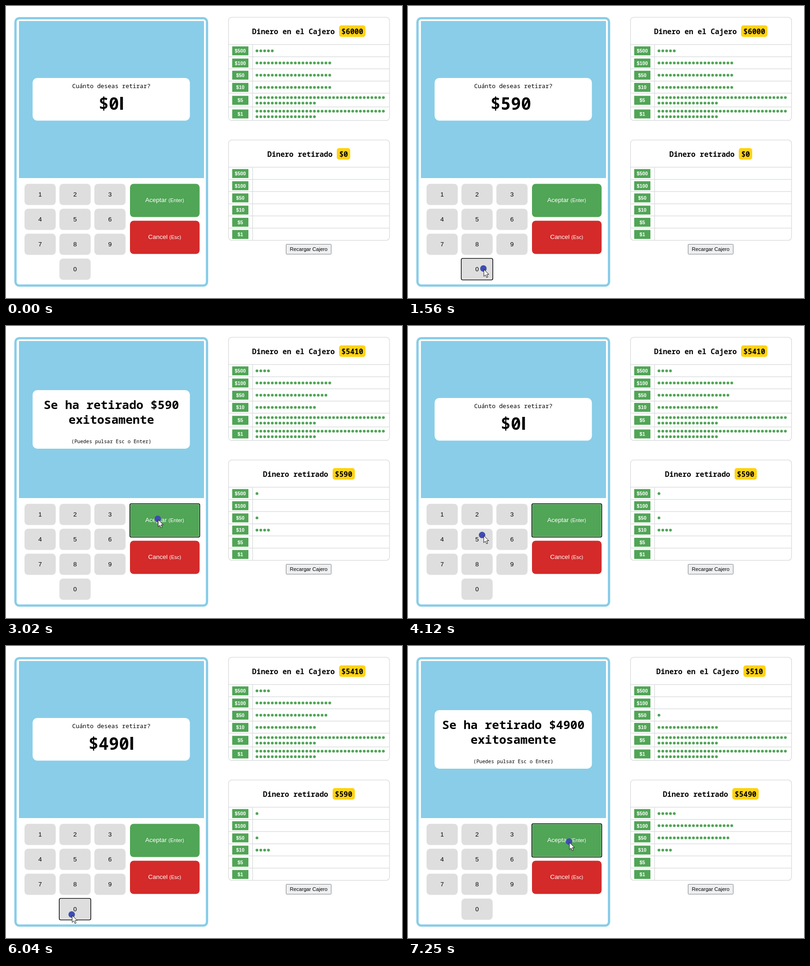
An HTML page that plays this animation: 856 px wide and 633 px high, repeating every 8000 ms.

```html
<!DOCTYPE html>
<html lang="es">
<head>
<meta charset="utf-8">
<title>Cajero</title>
<style>
  html, body { margin: 0; width: 100%; height: 100%; overflow: hidden; background: #fff; }
  svg { display: block; }
  text { font-family: "Liberation Sans", Arial, sans-serif; font-size: 13.5px; fill: #000; }
  .mid { text-anchor: middle; }
  .mono { font-family: "Noto Sans Mono", monospace; }
  .bold { font-weight: 700; }
  .semi { font-weight: 600; }
  .title { font-size: 15.67px; }
  .message { font-size: 25.66px; }
  .hint { font-size: 10.68px; }
  .ask { font-size: 12.83px; }
  .amount { font-size: 36.67px; }
  .caret { font-size: 40px; }
  .reload { font-size: 11.1px; }
  .bill { font-size: 10.7px; fill: #fff; }
  .action { fill: #fff; }
  .small { font-size: 11px; }
  .line { fill: none; stroke: #dcdedf; stroke-width: 1.5; }
  .dot { fill: #50a556; }
  .ring { fill: none; stroke: #111; stroke-width: 1.6; }
  .glow { fill: none; stroke: #fff; stroke-opacity: .6; stroke-width: .8; }
</style>
</head>
<body>
<svg id="stage" width="856" height="633" viewBox="0 0 856 633"></svg>
<script>
const LOOP = 8000, TICK = 120, DWELL = 120, REPLY = 100;
const BLUE = '#89cde8', GREEN = '#50a556', RED = '#d42a2a', GREY = '#dedede', GOLD = '#ffd314';
const BILLS = [500, 100, 50, 10, 5, 1];
const START = [5, 20, 20, 20, 50, 50];
const PER_LINE = 34;
const CENTER = 227.7;

// What the user does: the pointer arrives at (x, y) and presses the key.
const ACTIONS = [
  { t: 120, x: 456, y: 624 },
  { t: 720, x: 158, y: 463, key: '5' },
  { t: 1080, x: 226, y: 516, key: '9' },
  { t: 1440, x: 163, y: 569, key: '0' },
  { t: 1920, x: 350, y: 436, key: 'Aceptar' },
  { t: 2900, x: 328, y: 418 },
  { t: 3290, x: 328, y: 418, key: 'Enter' },
  { t: 4900, x: 84, y: 469, key: '4' },
  { t: 5440, x: 223, y: 512, key: '9' },
  { t: 5920, x: 142, y: 582, key: '0' },
  { t: 6280, x: 142, y: 582, key: '0' },
  { t: 6640, x: 338, y: 424, key: 'Aceptar' },
  { t: 7240, x: 348, y: 424 }
];

// Greedy payout, largest bills first.
function payOut(amount, stock) {
  return stock.map((have, i) => {
    const n = Math.min(have, Math.floor(amount / BILLS[i]));
    amount -= n * BILLS[i];
    return have - n;
  });
}

// Replays all presses up to t; the machine answers shortly after each one.
function machine(t) {
  const state = { amount: '0', done: false, focus: '', stock: START };
  for (const { t: pressed, key } of ACTIONS) {
    if (!key || pressed > t) continue;
    if (key !== 'Enter') state.focus = key;
    if (pressed + REPLY > t) continue;
    if (key === 'Enter') {
      state.amount = '0';
      state.done = false;
    } else if (key === 'Aceptar') {
      state.done = true;
      state.stock = payOut(+state.amount, state.stock);
    } else {
      state.amount = String(+(state.amount + key));
    }
  }
  return state;
}

// Rest after each action, then ease out towards the next one.
function position(t) {
  const next = ACTIONS.findIndex(a => a.t > t);
  const b = ACTIONS.at(next), a = next > 0 ? ACTIONS[next - 1] : b;
  const start = a.t + DWELL;
  const u = a === b ? 1 : Math.max(0, (t - start) / (b.t - start));
  const k = 1 - (1 - u) ** 1.8;
  return [a.x + (b.x - a.x) * k, a.y + (b.y - a.y) * k];
}

function snap(t) {
  const shift = t < 2400 ? 0 : 40;
  return Math.floor((t - shift) / TICK) * TICK + shift;
}

const rect = (x, y, w, h, r, fill, more = '') =>
  `<rect x="${x}" y="${y}" width="${w}" height="${h}" rx="${r}" fill="${fill}" ${more}/>`;
const text = (x, y, cls, str) => `<text x="${x}" y="${y}" class="${cls}">${str}</text>`;

function button(x, y, w, h, fill, focused, label) {
  const frame = (d, cls) => rect(x - d, y - d, w + 2 * d, h + 2 * d, 3, 'none', `class="${cls}"`);
  return rect(x, y, w, h, focused ? 3 : 8, fill) +
    (focused ? frame(-.9, 'glow') + frame(.3, 'ring') : '') + label;
}

function keypad(focus) {
  let out = '';
  [...'1234567890'].forEach((key, i) => {
    const x = 40 + 75.5 * (key === '0' ? 1 : i % 3);
    const y = 385.5 + 54 * Math.floor(i / 3);
    out += button(x, y, 67.5, 46, GREY, key === focus, text(x + 33.75, y + 27.3, 'mid', key));
  });
  [['Aceptar', 'Enter', GREEN], ['Cancel', 'Esc', RED]].forEach(([name, key, fill], i) => {
    const y = 385.5 + 80 * i;
    const label = `${name} <tspan class="small">(${key})</tspan>`;
    out += button(268, y, 150.5, 72, fill, name === focus, text(343, y + 39.7, 'mid action', label));
  });
  return out;
}

function dots(n, y) {
  let out = '';
  for (let i = 0; i < n; i++) {
    const cx = 542.5 + 8.28 * (i % PER_LINE);
    out += `<circle class="dot" cx="${cx}" cy="${y + 12 * Math.floor(i / PER_LINE)}" r="3"/>`;
  }
  return out;
}

function table(top, title, counts) {
  const total = '$' + counts.reduce((sum, n, i) => sum + n * BILLS[i], 0);
  const lead = (title.length + 1) * 9.4, badge = total.length * 9.4 + 10;
  const x = 654.6 - (lead + badge) / 2;
  let y = top + 59, lines = '';
  let out = text(x, top + 36, 'mono semi title', title) +
    rect(Math.round(x + lead), top + 17.5, Math.round(badge), 25, 5, GOLD) +
    text(x + lead + 5, top + 36, 'mono semi title', total);
  counts.forEach((n, i) => {
    const two = n > PER_LINE, h = two ? 29.6 : 26.4, mid = y + h / 2 + .5;
    lines += `M481 ${y}H829`;
    out += rect(489, mid - 9.7, 35, 19.4, 0, GREEN) +
      text(506.5, mid + 4, 'mid bold bill', '$' + BILLS[i]) +
      dots(n, two ? mid - 6 : mid);
    y += h;
  });
  return out + `<path class="line" d="${lines}M533 ${top + 59}V${y}"/>` +
    rect(481, top, 348, y - top, 7, 'none', 'class="line"');
}

function display({ amount, done }, t) {
  if (done) {
    return rect(57.5, 139, 340, 127, 10, '#fff') +
      text(CENTER, 179.5, 'mid mono semi message', 'Se ha retirado $' + amount) +
      text(CENTER, 211.7, 'mid mono semi message', 'exitosamente') +
      text(CENTER, 253.5, 'mid mono hint', '(Puedes pulsar Esc o Enter)');
  }
  const width = (amount.length + 1) * 22;
  const x = CENTER - (width + 11) / 2;
  const blink = (t + 150) % 1000 < 500;
  return rect(57.5, 156, 340, 92.5, 10, '#fff') +
    text(CENTER, 178, 'mid mono ask', 'Cuánto deseas retirar?') +
    text(x, 224.5, 'mono bold amount', '$' + amount) +
    (blink ? text(x + width, 224.5, 'bold caret', 'I') : '');
}

// The arrow trails its marker slightly.
function pointer(t) {
  if (t < ACTIONS[0].t) return '';
  const [x, y] = position(t), [ax, ay] = position(t - 15);
  return `<circle cx="${x}" cy="${y}" r="7" fill="#3f4db0"/>` +
    `<path transform="translate(${ax + 1} ${ay + 2})" fill="#fff" stroke="#111"
      d="M0 0V15.2L3.6 11.9L6 17.6L8.6 16.5L6.2 11H11Z"/>`;
}

function draw(t) {
  const state = machine(t), tick = snap(t);
  return rect(20.5, 26.5, 414, 579.5, 8, '#fff', `stroke="${BLUE}" stroke-width="5"`) +
    rect(28, 32.5, 400, 340.5, 0, BLUE) +
    display(state, tick) +
    keypad(state.focus) +
    table(24.5, 'Dinero en el Cajero', state.stock) +
    table(290.5, 'Dinero retirado', START.map((n, i) => n - state.stock[i])) +
    rect(605.5, 516.5, 97.5, 21.5, 1.5, '#eef0f1', 'stroke="#7b7f82"') +
    text(654.3, 531, 'mid reload', 'Recargar Cajero') +
    pointer(tick);
}

const stage = document.getElementById('stage');
const origin = performance.now();
let shown = '';
function frame() {
  const picture = draw((performance.now() - origin) % LOOP);
  if (picture !== shown) stage.innerHTML = shown = picture;
  requestAnimationFrame(frame);
}
frame();
</script>
</body>
</html>
```
